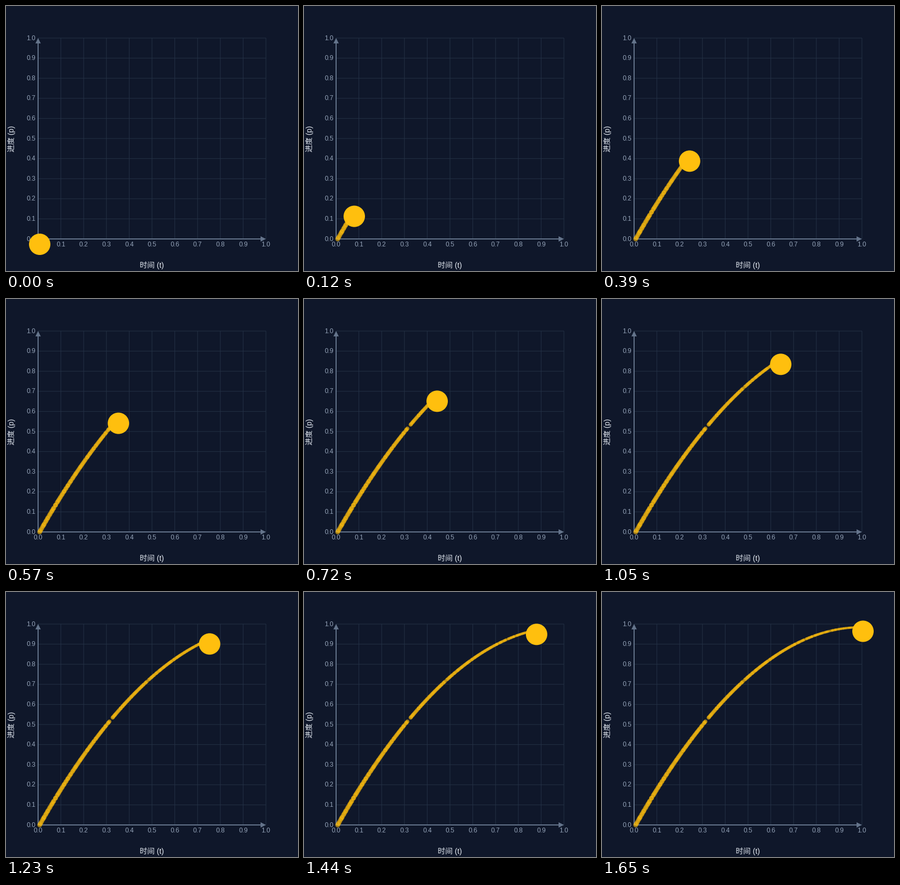
Write a matplotlib script that moves like this. It is 546 px wide and 496 px high and loops after 1.68 s.

```python
import numpy as np
import matplotlib.pyplot as plt
from matplotlib.animation import FuncAnimation
from matplotlib.patches import Circle, Polygon

W, H, DPI = 546, 496, 100
PX = 72 / DPI                      # points per pixel
FRAMES, STEP = 56, 30
LEFT, RIGHT, TOP, BOTTOM = 60, 486, 60, 436
BG, GRID, AXIS = "#0f172a", "#243145", "#64748b"
TICK, TITLE, AMBER = "#94a3b8", "#e2e8f0", "#ffbf0e"

plt.rcParams["font.family"] = ["Liberation Sans", "Noto Sans CJK JP"]

fig = plt.figure(figsize=(W / DPI, H / DPI), dpi=DPI, facecolor=BG)
ax = fig.add_axes([0, 0, 1, 1])
ax.set_xlim(0, W)
ax.set_ylim(H, 0)
ax.axis("off")


def line(x0, y0, x1, y1, color, width, z):
    ax.plot([x0, x1], [y0, y1], color=color, lw=width * PX, zorder=z,
            solid_capstyle="butt", snap=False)


def label(x, y, s, size, color, **kw):
    ax.text(x, y, s, fontsize=size * PX, color=color, va="baseline",
            zorder=3, **kw)


def draw_chart():
    for k in range(11):
        x = LEFT + (RIGHT - LEFT) * k / 10
        y = BOTTOM - (BOTTOM - TOP) * k / 10
        line(x, TOP, x, BOTTOM, GRID, 1, 1)
        line(LEFT, y, RIGHT, y, GRID, 1, 1)
        label(x, 450.3, f"{k / 10:.1f}", 12, TICK, ha="center")
        label(55.3, y + 3.6, f"{k / 10:.1f}", 12, TICK, ha="right")

    line(LEFT, BOTTOM, RIGHT - 5, BOTTOM, AXIS, 2, 2)
    line(LEFT, BOTTOM, LEFT, TOP + 5, AXIS, 2, 2)
    for tip in ([(RIGHT, BOTTOM), (RIGHT - 10, BOTTOM - 5), (RIGHT - 10, BOTTOM + 5)],
                [(LEFT, TOP), (LEFT - 5, TOP + 10), (LEFT + 5, TOP + 10)]):
        ax.add_patch(Polygon(tip, fc=AXIS, lw=0, zorder=2))

    label(273, 490, "时间 (t)", 14, TITLE, ha="center")
    label(15, 248, "进度 (p)", 14, TITLE, ha="center",
          rotation=90, rotation_mode="anchor")


def ball_pos(t):
    """Linear in x, quadratic ease-out in y."""
    return 63 + 425 * t, 446 - 372.5 * t * (2 - t)


draw_chart()

# Trail dots shrink with time and sit on a common lower-left corner.
rng = np.random.default_rng(4)
dot_t = np.linspace(0, 1, 237)
dot_t[1:-1] += rng.normal(0, 0.0007, 235)
for pause in (0.317, 0.478, 0.75, 0.86):
    dot_t = dot_t[np.abs(dot_t - pause) > 0.003]
bx, by = ball_pos(dot_t)
dots = np.column_stack([bx - 2.5 * dot_t, by - 10 + 2.5 * dot_t])
areas = (2 * (4.5 - 2.4 * dot_t) * PX) ** 2

trail = ax.scatter([], [], color=AMBER, alpha=0.6, linewidths=0, zorder=4)
ball = ax.add_patch(Circle(ball_pos(0), 20, fc=AMBER, lw=0, zorder=5))


def update(n):
    t = min(1, n / 54.85)
    count = np.searchsorted(dot_t, t, side="right")
    trail.set_offsets(dots[:count])
    trail.set_sizes(areas[:count])
    ball.center = ball_pos(t)
    return trail, ball


anim = FuncAnimation(fig, update, frames=FRAMES, interval=STEP,
                     repeat=True, repeat_delay=0)
plt.show()
```
